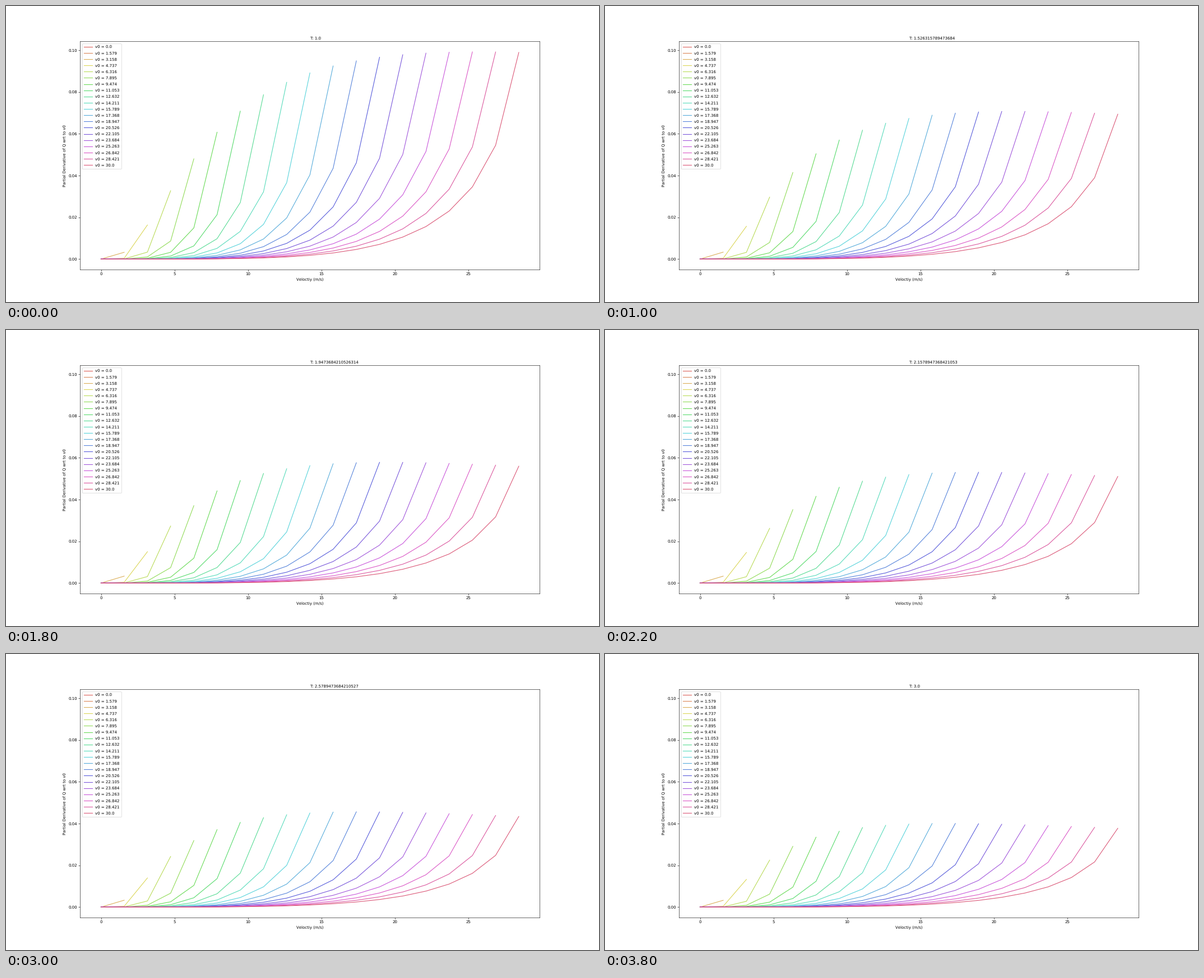
Animation of 1058x529 px, one loop 4 s. Source, as a matplotlib script:

```python
import colorsys
import numpy as np
import matplotlib.pyplot as plt
from matplotlib.animation import FuncAnimation

plt.rcParams.update({
    "font.family": "DejaVu Sans",
    "text.hinting": "none",
    "text.hinting_factor": 1,
})

N = 20
GAP, CAR = 2.0, 5.0  # standstill gap and vehicle length, m
SPEEDS = np.linspace(0, 30, N)
TIMES = np.linspace(1, 3, N)


def flow_slope(v, v0, T):
    """dQ/dv0 for Q = v / (s + CAR), s = (GAP + v T) / sqrt(1 - (v/v0)^4)."""
    r4 = (v / v0) ** 4
    reach = GAP + v * T
    s = reach / np.sqrt(1 - r4)
    ds = -2 * reach * r4 / v0 * (1 - r4) ** -1.5
    return -v * ds / (s + CAR) ** 2


def curve(i, T):
    v = SPEEDS[:i]
    return v, (flow_slope(v, SPEEDS[i], T) if i else v)


fig = plt.figure(figsize=(20, 10), dpi=52.9)
ax = fig.add_subplot()
lines = []
for i, v0 in enumerate(SPEEDS):
    color = colorsys.hls_to_rgb((0.01 + i / N) % 1, 0.6, 0.65)
    lines += ax.plot(*curve(i, TIMES[0]), color=color, label=f"v0 = {round(v0, 3)}")

ax.set_xlabel("Veloctiy (m/s)")
ax.set_ylabel("Partial Derivative of Q wrt to v0")
ax.set_xlim(ax.get_xlim())
ax.set_ylim(ax.get_ylim())
title = ax.text(0.5, 1.01, "", transform=ax.transAxes)


def add_legend(spacing):
    return ax.legend(loc="upper left", labelspacing=spacing)


# Fit the row spacing to the box height
HEIGHT = 224
em = 10 * fig.dpi / 72
fig.canvas.draw()
box = add_legend(0.5).get_window_extent()
add_legend(0.5 + (HEIGHT - box.height) / ((N - 1) * em))


def update(k):
    for i, line in enumerate(lines):
        line.set_data(*curve(i, TIMES[k]))
    title.set_text(f"T: {TIMES[k]}")
    return [*lines, title]


anim = FuncAnimation(fig, update, frames=N, interval=200, init_func=lambda: update(0),
                     repeat=True, repeat_delay=0)
plt.show()
```
